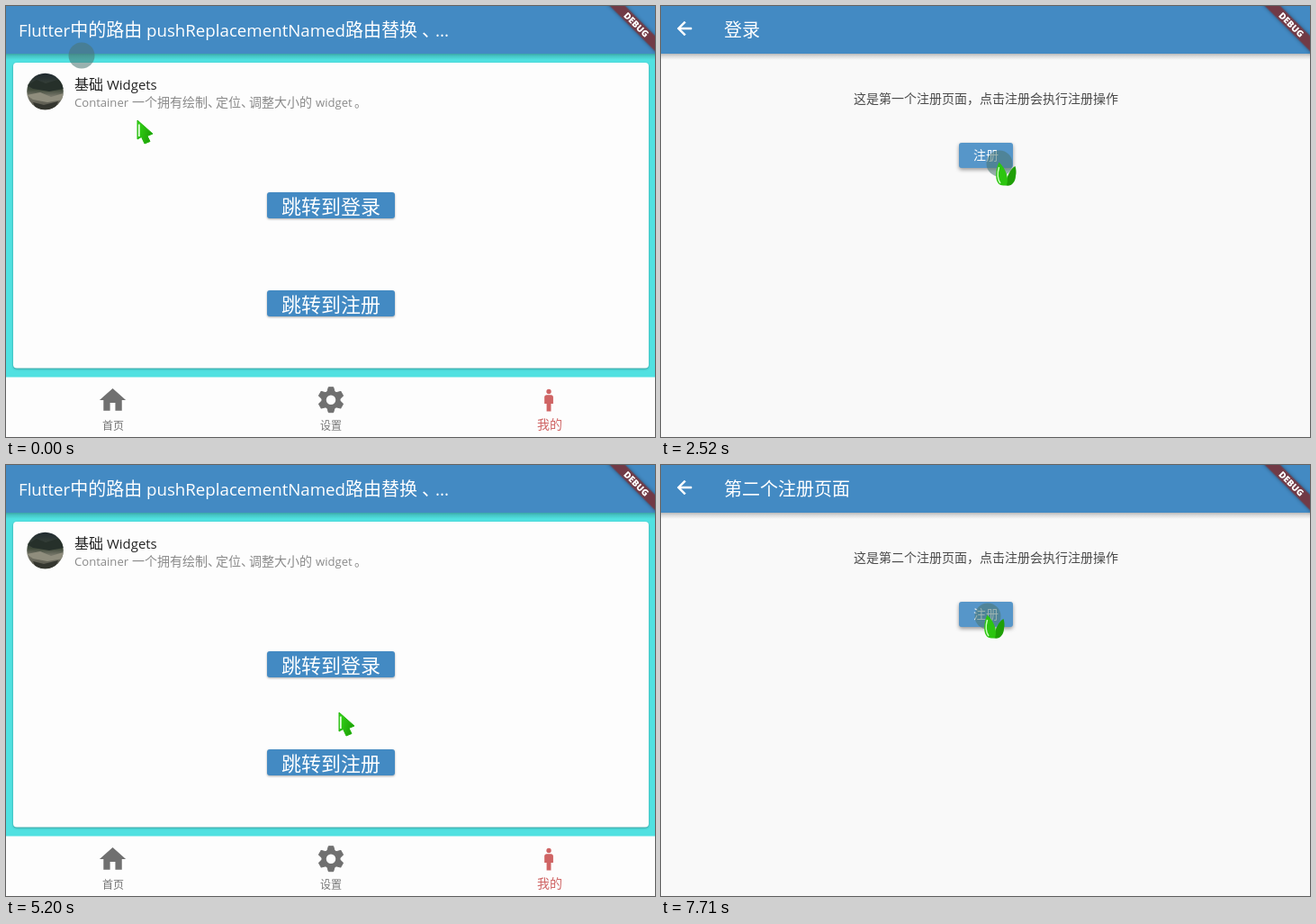
Recreate the animation shown at these times as an HTML page. Size 721 px wide and 479 px high, loop 8000 ms.

```html
<!DOCTYPE html>
<html lang="zh-CN">
<head>
<meta charset="utf-8">
<title>路由替换</title>
<style>
  html, body { margin: 0; width: 100%; height: 100%; overflow: hidden; background: #f9f9f9; }
  svg { display: block; width: 721px; height: 479px; }
  text { font-family: "Noto Sans CJK SC", "Noto Sans CJK", sans-serif; font-weight: 300; white-space: pre; }
  .latin { font-family: "Open Sans", "Noto Sans", sans-serif; font-weight: 400; }
  .raised { filter: drop-shadow(0 1.5px 1.2px rgba(0, 0, 0, .32)); }
  .lifted { filter: drop-shadow(0 2px 2px rgba(0, 0, 0, .4)); }
</style>
</head>
<body>
<svg id="stage" viewBox="0 0 721 479">
  <defs>
    <linearGradient id="shade" x2="0" y2="1">
      <stop stop-color="#000" stop-opacity=".26"/>
      <stop offset=".4" stop-color="#000" stop-opacity=".12"/>
      <stop offset="1" stop-color="#000" stop-opacity="0"/>
    </linearGradient>
    <linearGradient id="photo" x2="0" y2="1">
      <stop stop-color="#1f2930"/><stop offset=".45" stop-color="#414b3c"/>
      <stop offset=".62" stop-color="#77776a"/><stop offset="1" stop-color="#4b4a40"/>
    </linearGradient>
    <linearGradient id="green" x2="1" y2=".4">
      <stop stop-color="#35da18"/><stop offset="1" stop-color="#1da006"/>
    </linearGradient>
    <clipPath id="buttonClip"><rect x="290" y="316" width="142" height="29" rx="3"/></clipPath>
    <clipPath id="avatarClip"><circle cx="43.5" cy="95" r="20.3"/></clipPath>
  </defs>
  <g id="pages"></g>
  <g transform="translate(721 0) rotate(45)">
    <rect x="-40" y="23.4" width="80" height="12" fill="#713a46"
      style="filter:drop-shadow(0 0 2px rgba(0,0,0,.4))"/>
    <text class="latin" y="33" text-anchor="middle" font-size="10" style="font-weight:800" fill="#fff">DEBUG</text>
  </g>
  <circle id="touch" fill="#4b7673"/>
  <g id="arrow">
    <path d="M0 0V21L4.5 18.5L8 26L14 23.5L11 17.5L17 15Z" fill="url(#green)" stroke="#22b50b" stroke-linejoin="round"/>
    <path d="M1.8 4.5V18" stroke="#e8ffe2" stroke-width="1.8"/>
  </g>
  <g id="leaf">
    <path d="M17.500 3C12 6 9 13 6 24C12 27 18 21 18 14C19 10 18.500 6 17.500 3Z" fill="#1f9f07"/>
    <path d="M-.5 -1.500C-4 6 -5 16 -2 21C0 25 5 25 8 24C11 16 7 6 -.5 -1.500Z" fill="#2cc510"/>
    <path d="M-.5 4C-2.500 11 -2 18 1 22" fill="none" stroke="#c9ffbd" stroke-width="1.500"/>
  </g>
</svg>
<script>
const BLUE = '#438ac3', GREY = '#707070', RED = '#cf6464';
const LOOP = 8000, SLIDE = 300, HEIGHT = 479;
const $ = id => document.getElementById(id);

// Latin runs use a slightly smaller face than the Chinese around them.
function text(x, y, size, fill, str) {
  const runs = str.replace(/[\x20-\x7e]+/g,
    run => `<tspan class="latin" font-size="${size * .935}">${run}</tspan>`);
  return `<text x="${x}" y="${y}" font-size="${size}" fill="${fill}">${runs}</text>`;
}

const rect = (x, y, w, h, fill, extra = '') =>
  `<rect x="${x}" y="${y}" width="${w}" height="${h}" fill="${fill}" ${extra}/>`;

const button = (x, y, w, h, size, baseline, label) =>
  rect(x, y, w, h, BLUE, 'rx="3" class="raised face"') + text(x + 16, baseline, size, '#fff', label);

const bar = () => rect(0, 53, 721, 7, 'url(#shade)') + rect(0, 0, 721, 53, BLUE);

function gear() {
  const teeth = [0, 1, 2, 3, 4, 5].map(i =>
    `<path d="M-4.300 -8L-2.700 -14H2.700L4.300 -8Z" stroke-width="1" stroke-linejoin="round" transform="rotate(${i * 60})"/>`);
  return `<g transform="translate(361 437.700)" fill="${GREY}" stroke="${GREY}">${teeth.join('')}
    <circle r="7.900" fill="none" stroke-width="5.300"/></g>`;
}

const avatar = () => `<g clip-path="url(#avatarClip)">
  ${rect(23, 74, 41, 42, 'url(#photo)')}
  <path d="M23 88L34 82L44 86L64 80V92L48 95L30 92Z" fill="#26302a"/>
  <path d="M23 99L38 96L50 101L64 97V104L46 107L30 104Z" fill="#8f8d7d"/>
  <path d="M30 107L42 110L58 106L54 116H34Z" fill="#34362f"/></g>`;

const homePage = () => rect(0, 0, 721, HEIGHT, '#50e1e1') + bar()
  + text(14, 33.5, 20, '#fff', 'Flutter中的路由 pushReplacementNamed路由替换 、') + text(477, 33.5, 20, '#fff', '...')
  + rect(8, 63, 706, 339.5, '#fdfdfd', 'rx="4" class="raised"')
  + avatar()
  + text(76, 93, 16, '#222', '基础 Widgets')
  + [[76, 'Container'], [140, '一个拥有绘制、'], [233, '定位、'], [270, '调整大小的'], [344, 'widget'], [387, '。']]
    .map(([x, part]) => text(x, 112, 14, '#8a8a8a', part)).join('')
  + button(290, 207, 142, 29, 22, 230.5, '跳转到登录')
  + button(290, 316, 142, 29, 22, 339.5, '跳转到注册')
  + '<g clip-path="url(#buttonClip)"><circle class="ink" cx="414" cy="334" fill="#fff" fill-opacity=".2"/></g>'
  + rect(0, 412.5, 721, 67, '#fdfdfd')
  + `<path transform="translate(101 420.500) scale(1.460)" fill="${GREY}" d="M10 20v-6h4v6h5v-8h3L12 3 2 12h3v8z"/>`
  + gear()
  + `<g transform="translate(588.400 423.600) scale(1.220)" fill="${RED}"><circle cx="12" cy="4" r="2.200"/>
     <path d="M14 7h-4c-1.100 0-2 .9-2 2v6h2v7h4v-7h2V9c0-1.100-.9-2-2-2z"/></g>`
  + text(107, 470.5, 12, '#757575', '首页') + text(349, 470.5, 12, '#757575', '设置') + text(590, 469.5, 14, RED, '我的');

const formPage = (title, order, label) => rect(0, 0, 721, HEIGHT, '#f9f9f9') + bar()
  + '<path transform="translate(14 13)" fill="#fff" stroke="#fff" stroke-width=".5" d="M20 11H7.830l5.590-5.590L12 4l-8 8 8 8 1.410-1.410L7.830 13H20z"/>'
  + text(70, 33.5, 20, '#fff', title)
  + text(214, 108, 14, '#4a4a4a', `这是第${order}个注册页面，点击注册会执行注册操作`)
  + button(331, 152, 60, 28, 14, 171, label)
  + rect(331, 152, 60, 28, '#fff', 'rx="3" class="ink" fill-opacity=".1"');

const pages = Object.entries({
  home: homePage(),
  first: formPage('登录', '一', '注册'),
  second: formPage('第二个注册页面', '二', '注册'),
  third: formPage('第三个注册页面', '三', '确定'),
}).reduce((all, [name, markup]) => {
  const g = document.createElementNS('http://www.w3.org/2000/svg', 'g');
  g.innerHTML = markup;
  all[name] = { g, ink: g.querySelector('.ink'), face: [...g.querySelectorAll('.face')].pop() };
  return all;
}, {});

// The screen refreshes in bursts: first time, last time, count.
const steps = [0, ...[[160, 1140, 6], [1340, 2330, 6], [2520, 3450, 6], [3650, 4430, 5],
  [4810, 5760, 6], [5960, 6930, 6], [7130, 7710, 4]]
  .flatMap(([a, b, n]) => Array.from({ length: n }, (_, i) => a + (b - a) * i / (n - 1)))];

const routes = [[-1000, 'home'], [1700, 'first'], [2584, 'second'], [3547, 'third'],
  [4760, 'home'], [5920, 'first'], [6850, 'second']];

// time, x, y, drift x, drift y, pressed page
const touches = [[0, 84, 55, 0, 0, null], [1540, 414, 334, 0, 0, 'home'], [2520, 376, 175, 0, 0, 'first'],
  [3450, 370, 168, 0, 0, 'second'], [4430, 365.5, 162.5, 0, 0, 'third'],
  [5760, 367, 333, -5, -46, 'home'], [6740, 363, 169, 0, 0, 'first'], [7710, 363, 168, 0, 0, 'second']];

const pointer = [[0, 146, 127], [356, 270, 235], [748, 380, 315], [1140, 414, 334], [1540, 414, 334],
  [1738, 408, 310], [2134, 382, 205], [2330, 376, 175], [2520, 376, 175], [2900, 374, 178], [3450, 370, 168],
  [3850, 368, 172], [4430, 365.5, 162.5], [4810, 366, 180], [5190, 370, 275], [5570, 367, 333], [5760, 367, 333],
  [5960, 360, 308], [6160, 345, 257], [6540, 361, 178], [6740, 363, 169], [7710, 363, 168], [8000, 363, 168]];

const lastBefore = (list, t, key = v => v[0]) => list.findLastIndex(v => key(v) <= t + .01);

function bezier(x1, y1, x2, y2) {
  const at = (a, b, s) => 3 * a * s * (1 - s) ** 2 + 3 * b * s * s * (1 - s) + s ** 3;
  return x => {
    let lo = 0, hi = 1;
    for (let i = 0; i < 24; i++) {
      const mid = (lo + hi) / 2;
      at(x1, x2, mid) < x ? lo = mid : hi = mid;
    }
    return at(y1, y2, lo);
  };
}
const slideCurve = bezier(.4, 0, .2, 1), fadeCurve = bezier(.42, 0, 1, 1);

function pointerAt(t) {
  const i = Math.min(lastBefore(pointer, t), pointer.length - 2);
  const [t0, x0, y0] = pointer[i], [t1, x1, y1] = pointer[i + 1];
  const k = (t - t0) / (t1 - t0);
  return [x0 + (x1 - x0) * k, y0 + (y1 - y0) * k];
}

function drawPages(t) {
  const i = lastBefore(routes, t);
  const [start, name] = routes[i];
  const k = Math.min(1, (t - start) / SLIDE);
  const top = pages[name].g;
  top.setAttribute('transform', `translate(0 ${Math.round((1 - slideCurve(k)) * HEIGHT / 4)})`);
  top.setAttribute('opacity', k < 1 ? fadeCurve(k) : 1);
  if (k === 1) return $('pages').replaceChildren(top);
  const below = pages[routes[i - 1][1]].g;
  below.setAttribute('transform', '');
  below.setAttribute('opacity', 1);
  $('pages').replaceChildren(below, top);
}

function drawTouch(t) {
  const [start, x, y, dx, dy, pressed] = touches[lastBefore(touches, t)];
  const age = t - start, k = age / 400;
  const held = age < 100;
  const [px, py] = pointerAt(t);
  const circle = $('touch');
  circle.setAttribute('cx', x + dx * k);
  circle.setAttribute('cy', y + dy * k);
  circle.setAttribute('r', 14.5 + 4.5 * k);
  circle.setAttribute('opacity', age > 450 ? 0 : .56 - .36 * k);
  const leaf = held && pressed;
  $('leaf').setAttribute('display', leaf ? 'inline' : 'none');
  $('arrow').setAttribute('display', leaf ? 'none' : 'inline');
  $(leaf ? 'leaf' : 'arrow').setAttribute('transform', `translate(${px} ${py})`);
  for (const [name, { ink, face }] of Object.entries(pages)) {
    const active = name === pressed && age < 450;
    ink.setAttribute('display', active ? 'inline' : 'none');
    face.setAttribute('class', active ? 'lifted face' : 'raised face');
    if (name === 'home') ink.setAttribute('r', held ? 27 : 140);
  }
}

let shown = -1;
function tick() {
  const step = lastBefore(steps, performance.now() % LOOP, v => v);
  if (step !== shown) {
    shown = step;
    drawPages(steps[step]);
    drawTouch(steps[step]);
  }
  requestAnimationFrame(tick);
}
tick();
</script>
</body>
</html>
```
